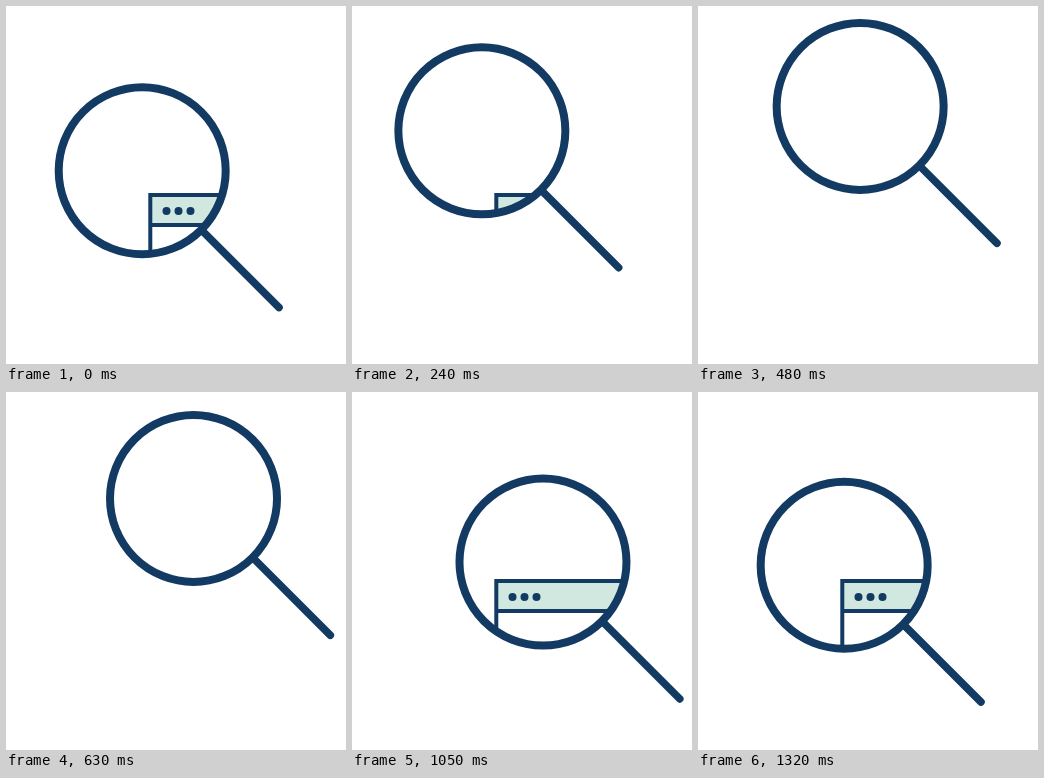
These frames come from a looping animation (340x358 px, 1350 ms). An HTML page:

```html
<!DOCTYPE html>
<html lang="en">
<head>
<meta charset="utf-8">
<title>Searching</title>
<style>
  html, body { margin: 0; width: 100%; height: 100%; overflow: hidden; background: #fff; }
  svg { display: block; }
  .line { fill: none; stroke: #123a62; }
</style>
</head>
<body>
<svg width="340" height="358" viewBox="0 0 340 358">
  <clipPath id="view"><circle id="hole" r="83.5"/></clipPath>
  <g clip-path="url(#view)">
    <rect x="144.3" y="189" width="180" height="30" fill="#d0e8df"/>
    <path class="line" stroke-width="4" d="M144.3 300V189H324V300M144.3 219H324"/>
    <g fill="#123a62">
      <circle cx="160.5" cy="205" r="4"/>
      <circle cx="172.5" cy="205" r="4"/>
      <circle cx="184.5" cy="205" r="4"/>
    </g>
  </g>
  <g id="glass" class="line" stroke-width="8" stroke-linecap="round">
    <circle r="83.5"/>
    <path d="M60 60L136.8 136.8" stroke-width="7.6"/>
  </g>
</svg>
<script>
  const LOOP = 1350, STEP = 30;
  const orbit = { x: 166.3, y: 139.5, r: 39.3, start: 140, speed: 0.2582 }; // degrees, degrees per ms
  const hole = document.getElementById('hole');
  const glass = document.getElementById('glass');
  let begin;

  function draw(now) {
    begin ??= now;
    const t = Math.floor(((now - begin) % LOOP) / STEP) * STEP;
    const angle = (orbit.start + orbit.speed * t) * Math.PI / 180;
    const move = `translate(${orbit.x + orbit.r * Math.cos(angle)} ${orbit.y + orbit.r * Math.sin(angle)})`;
    hole.setAttribute('transform', move);
    glass.setAttribute('transform', move);
    requestAnimationFrame(draw);
  }
  draw(performance.now());
</script>
</body>
</html>
```
